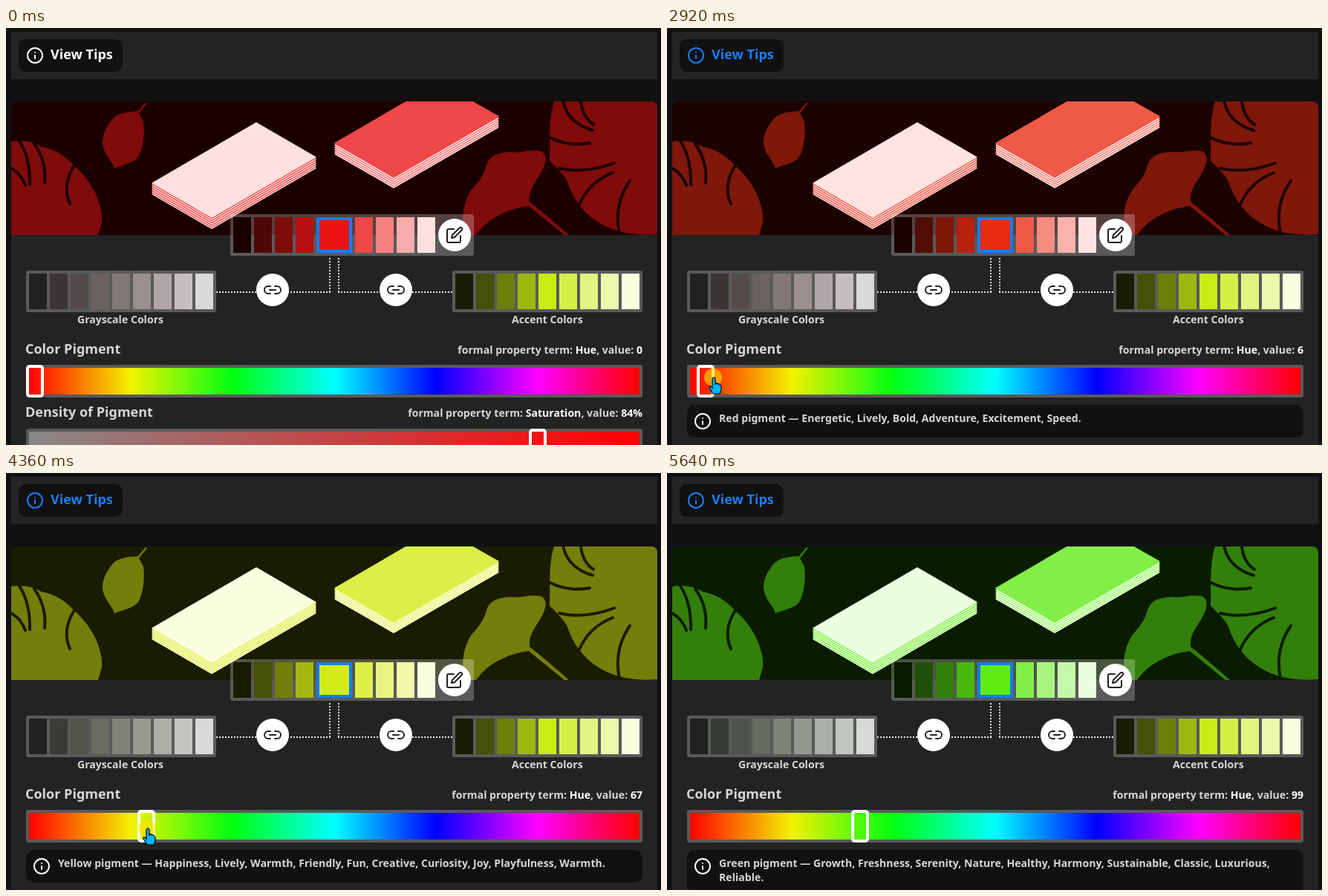
An HTML page that plays this animation: 882 px wide and 562 px high, repeating every 6440 ms.

```html
<!DOCTYPE html>
<html lang="en">
<head>
<meta charset="utf-8">
<title>Color pigment picker</title>
<style>
  html, body { margin: 0; width: 100%; height: 100%; overflow: hidden; background: #111; }
  svg { display: block; --h: 0; font: bold 14.1px "Noto Sans", sans-serif; }
  text { fill: #d6d6d6; white-space: pre; }
  .title { font-size: 18px; }
  .strong { fill: #fff; }
  .panel { fill: #232323; }
  .frame { fill: rgba(255, 255, 255, .25); }
  .dark { fill: hsl(var(--h) 100% 5.5%); }
  .leaf { fill: hsl(var(--h) 84% 27%); }
  .slits { fill: none; stroke: hsl(var(--h) 100% 5.5%); stroke-width: 4; stroke-linecap: round; }
  .bright { fill: hsl(var(--h) 84% 61%); }
  .pale { fill: hsl(var(--h) 100% 94%); }
  .line { fill: none; stroke: #fff; stroke-width: 2; stroke-linecap: round; stroke-linejoin: round; }
  .ink { stroke: #222; }
  .dots { fill: none; stroke: #e8e8e8; stroke-width: 2; stroke-dasharray: 2 2; }
  .thumb { fill: none; stroke: #fff; stroke-width: 4; }
</style>
</head>
<body>
<svg width="882" height="562" viewBox="0 0 882 562">
  <defs>
    <clipPath id="banner"><path d="M7 279V107a8 8 0 0 1 8-8H869a8 8 0 0 1 8 8V279Z"/></clipPath>
    <linearGradient id="rainbow"></linearGradient>
    <linearGradient id="density"><stop stop-color="#888"/><stop offset="1" stop-color="#f00"/></linearGradient>
    <g id="info"><circle class="line" r="10"/><path class="line" d="M0 0V4M0-4V-3.9"/></g>
    <g id="link">
      <circle r="22" fill="#fff"/>
      <path class="line ink" d="M3-5H6A5 5 0 0 1 6 5H3M-3 5H-6A5 5 0 0 1-6-5H-3M-4 0H4"/>
    </g>
  </defs>

  <rect width="882" height="562" fill="#111"/>
  <rect class="panel" x="7" y="5" width="870" height="64"/>
  <rect id="button" x="17" y="15" width="140" height="44" rx="10"/>
  <g id="buttonIcon" transform="translate(39 37)">
    <circle r="10" fill="none" stroke="currentColor" stroke-width="2"/>
    <path d="M0 0V4M0-4V-3.9" stroke="currentColor" stroke-width="2" stroke-linecap="round"/>
    <text class="title" x="21" y="5" style="fill: currentColor">View Tips</text>
  </g>

  <path class="panel" d="M7 562V107a8 8 0 0 1 8-8H869a8 8 0 0 1 8 8V562Z"/>
  <g clip-path="url(#banner)">
    <rect class="dark" x="7" y="99" width="870" height="180"/>
    <g class="leaf">
      <path d="M7 153C20 151 34 152 48 160C68 164 82 174 92 186C116 206 131 238 129 262L124 279H7Z"/>
      <path d="M178 112C164 113 152 114 144 122C135 132 129 146 130 156C133 173 143 178 146 189C158 184 172 182 178 174C185 162 187 142 185 126L179 115L190 101L188 100Z"/>
      <path d="M617 279C613 252 616 236 626 219C636 207 643 200 647 185C651 173 660 168 680 167C692 169 704 163 720 166C728 169 728 179 724 188C717 204 703 216 705 234C721 247 740 263 758 279H752L704 240C678 243 650 255 633 279Z"/>
      <path d="M738 99H877V278C842 281 814 274 792 258C775 246 762 226 757 210C754 200 743 190 732 179C733 152 730 124 738 99Z"/>
    </g>
    <g class="slits">
      <path d="M18 152Q33 176 32 211"/>
      <path d="M38 156Q55 180 52 209"/>
      <path d="M92 185Q75 212 86 237"/>
      <path d="M7 189Q20 196 26 212"/>
      <path d="M750 98Q756 128 790 138"/>
      <path d="M774 98Q776 120 791 130"/>
      <path d="M733 148Q757 160 786 155"/>
      <path d="M745 189Q780 197 819 182"/>
      <path d="M771 240Q784 208 817 195"/>
      <path d="M826 277Q818 238 840 206"/>
    </g>
    <g id="cards"></g>
  </g>

  <rect class="frame" x="302" y="251" width="328" height="56" rx="3"/>
  <g id="swatches"></g>
  <rect x="420" y="257" width="44" height="44" fill="none" stroke="#147cf5" stroke-width="4"/>
  <circle cx="604" cy="279" r="22" fill="#fff"/>
  <path class="line ink" transform="translate(592 267)" d="M11 4H4A2 2 0 0 0 2 6V20A2 2 0 0 0 4 22H18A2 2 0 0 0 20 20V13M18.5 2.5A2.1 2.1 0 0 1 21.5 5.5L12 15L8 16L9 12Z"/>
  <path class="dots" d="M436 310V355M448 310V355M283 356H437M447 356H601"/>
  <use href="#link" x="359" y="353"/>
  <use href="#link" x="525" y="353"/>
  <text x="96" y="398">Grayscale Colors</text>
  <text x="681" y="398">Accent Colors</text>

  <text class="title" x="26" y="439">Color Pigment</text>
  <text x="857" y="439" text-anchor="end">formal property term: <tspan class="strong">Hue</tspan>, value: <tspan class="strong" id="hueValue">0</tspan></text>
  <rect class="frame" x="27" y="454" width="830" height="44" rx="3"/>
  <rect x="31" y="458" width="822" height="36" fill="url(#rainbow)"/>
  <rect class="thumb" id="hueThumb" y="456" width="20" height="40" rx="3"/>

  <g id="densityRow">
    <text class="title" x="26" y="524">Density of Pigment</text>
    <text x="857" y="524" text-anchor="end">formal property term: <tspan class="strong">Saturation</tspan>, value: <tspan class="strong">84%</tspan></text>
    <rect class="frame" x="27" y="540" width="830" height="44" rx="3"/>
    <rect x="31" y="544" width="822" height="36" fill="url(#density)"/>
    <rect class="thumb" x="706" y="542" width="20" height="40" rx="3"/>
  </g>

  <rect id="tipBox" x="27" y="508" width="830" rx="10" fill="#111"/>
  <g id="tip">
    <use href="#info" x="48" y="530"/>
    <text id="tipLine1" x="70" y="531"></text>
    <text id="tipLine2" x="70" y="550"></text>
  </g>

  <g id="cursor">
    <circle id="press" r="12" fill="#ffe000" opacity=".6"/>
    <path transform="translate(1 1)" d="M-2 2Q-2-1 0-1Q2-1 2 2V8Q4 6 6 8Q8 7 9 10Q10 10 10 12V16L8 21H-1L-6 13Q-7 10-4 11L-2 13Z" fill="#00b6ff" stroke="#000" stroke-width="1.2"/>
  </g>
</svg>
<script>
const LOOP = 6440, STEP = 40;
const $ = id => document.getElementById(id);
const clamp = v => Math.max(0, Math.min(1, v));
const ramp = (t, from, to) => clamp((t - from) / (to - from));
const ease = p => p * p * (3 - 2 * p);
const mix = (a, b, p) => a + (b - a) * p;

// Each key is [time, ...values]; values are interpolated linearly.
function track(keys, t) {
  const next = keys.findIndex(k => k[0] > t);
  if (next === 0) return keys[0].slice(1);
  if (next < 0) return keys.at(-1).slice(1);
  const a = keys[next - 1], b = keys[next], p = ramp(t, a[0], b[0]);
  return a.slice(1).map((v, i) => mix(v, b[i + 1], p));
}

const hueKeys = [[2480, 0], [2720, 1], [2920, 6], [3040, 11], [3440, 35], [4360, 67], [5160, 94], [5400, 99]];
const leaveKeys = [[1680, 95, 28], [1720, 98, 58], [2160, 56, 425], [2320, 49, 474]];
const dragKeys = [[2320, 49, 474], [2720, 51, 472], [2920, 62, 471], [3440, 123, 471],
  [4360, 190, 479], [5160, 252, 484], [5400, 263, 488], [5600, 265, 515]];

// Each tip applies below its hue limit.
const tips = [
  [15, "Red pigment — Energetic, Lively, Bold, Adventure, Excitement, Speed."],
  [50, "Orange pigment — Energetic, Comfort, Joy, Playfulness, Creativity, Lively, Accessible, Youth."],
  [78, "Yellow pigment — Happiness, Lively, Warmth, Friendly, Fun, Creative, Curiosity, Joy, Playfulness, Warmth."],
  [360, "Green pigment — Growth, Freshness, Serenity, Nature, Healthy, Harmony, Sustainable, Classic, Luxurious,", "Reliable."]
];

function buildStatic() {
  const stops = ["#f00", "#f2f200", "#0f1", "#0ff", "#00f", "#f0f", "#f00"];
  $("rainbow").innerHTML = stops.map((color, i) =>
    `<stop offset="${i / 6}" stop-color="${color}"/>`).join("");

  const stack = (points, top, paleEdge) => {
    const sheet = (cls, dy) => `<polygon class="${cls}" points="${points}" transform="translate(0 ${dy})"/>`;
    let out = "";
    for (let dy = 15; dy > 0; dy -= 3) out += sheet("pale", dy) + sheet("bright", dy - paleEdge);
    return out + sheet(top, 0);
  };
  $("cards").innerHTML = stack("196,209 337,127 418,174 277,256", "pale", 1.5)
    + stack("442,155 583,73 664,119 522,201", "bright", 2);

  const tones = [5.5, 17, 27, 39, 50, 61, 73, 82, 94];
  const tone = (hue, i) => `hsl(${hue} ${i % 8 ? 84 : 100}% ${tones[i]}%)`;
  const swatch = (x, y, w, fill) => `<rect x="${x}" y="${y}" width="${w}" height="48" style="fill: ${fill}"/>`;
  const row = (x, color) => `<rect class="frame" x="${x}" y="327" width="256" height="56" rx="3"/>`
    + tones.map((_, i) => swatch(x + 4 + 28 * i, 331, 24, color(i))).join("");
  $("swatches").innerHTML =
    tones.map((_, i) => swatch(306 + 28 * i + (i > 4 ? 24 : 0), 255, i === 4 ? 48 : 24, tone("var(--h)", i))).join("")
    + row(27, i => `hsl(var(--h) ${i % 8 ? 5 : 2}% ${13 + 9 * i}%)`)
    + row(601, i => tone(69, i));
}

function cursorAt(t) {
  if (t >= 2320) return track(dragKeys, t);
  if (t >= 1680) return track(leaveKeys, t);
  const p = ease(ramp(t, 400, 920));
  return [mix(254, 95, p), mix(294, 28, p)];
}

function draw(t) {
  const hue = Math.round(track(hueKeys, t)[0]);
  document.querySelector("svg").style.setProperty("--h", hue);
  $("hueValue").textContent = hue;
  $("hueThumb").setAttribute("x", 29 + Math.floor(hue * 806 / 360));

  const hover = ramp(t, 720, 920) * (1 - ramp(t, 1720, 1920));
  const gray = mix(17, 91, hover);
  $("button").setAttribute("fill", `rgb(${gray} ${gray} ${gray})`);
  const open = ramp(t, 1040, 1280);
  $("buttonIcon").style.color = `rgb(${mix(255, 24, open)} ${mix(255, 126, open)} ${mix(255, 248, open)})`;

  const [, line1, line2 = ""] = tips.find(tip => hue < tip[0]);
  $("densityRow").setAttribute("transform", `translate(0 ${54 * open})`);
  $("tipBox").setAttribute("height", (line2 ? 57 : 44) * open);
  $("tip").setAttribute("opacity", open);
  $("tipLine1").textContent = line1;
  $("tipLine2").textContent = line2;

  const [x, y] = cursorAt(t);
  $("cursor").setAttribute("transform", `translate(${x} ${y})`);
  $("cursor").style.display = t >= 440 && t < 5640 ? "" : "none";
  const pressed = (t >= 1120 && t < 1280) || (t >= 2400 && t < 5400);
  $("press").style.display = pressed ? "" : "none";
}

function tick() {
  const t = performance.now() % LOOP;
  draw(Math.floor(t / STEP) * STEP);
  requestAnimationFrame(tick);
}

buildStatic();
tick();
</script>
</body>
</html>
```
